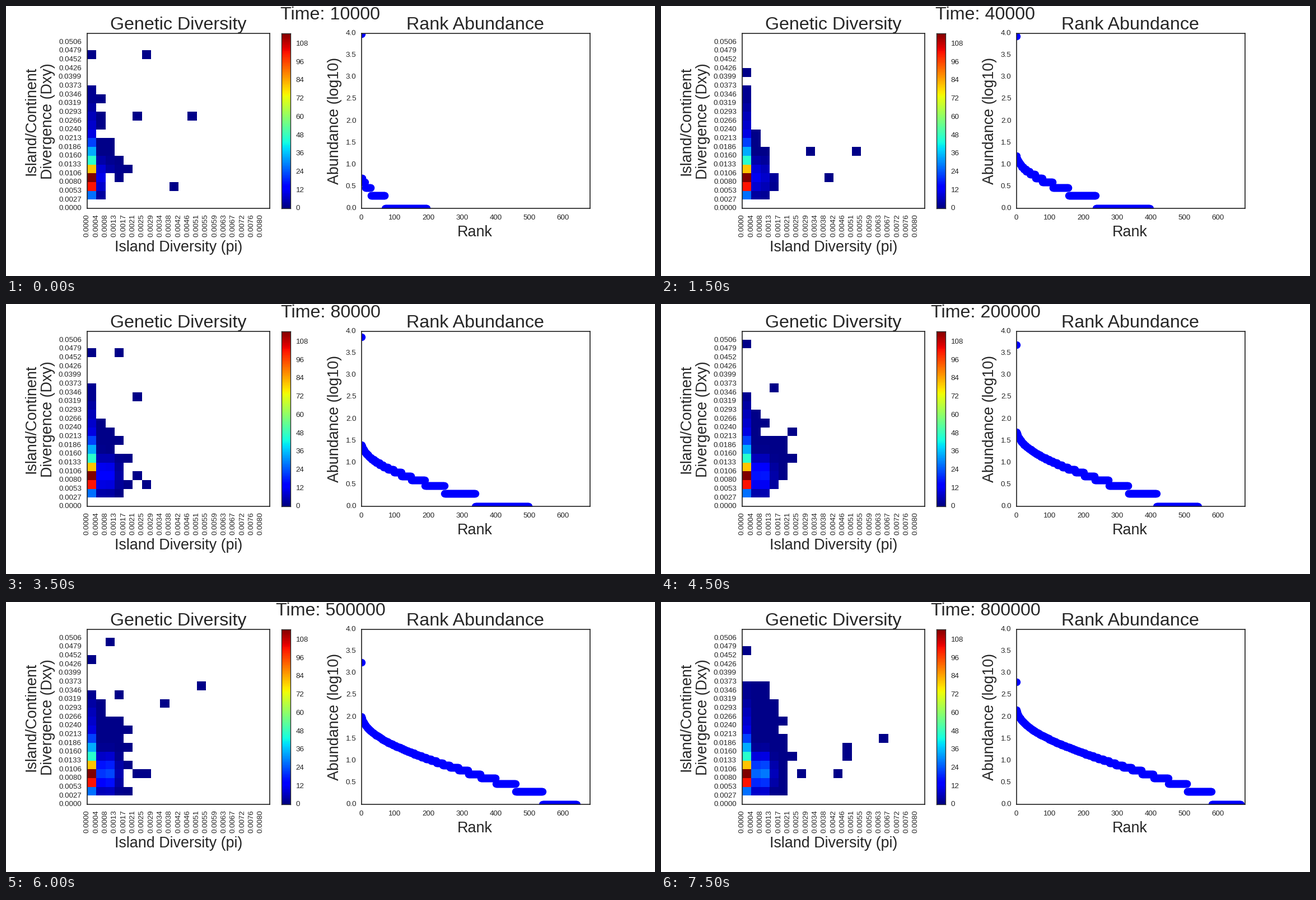
A matplotlib script for the animation above (8000 ms loop, 1159 px wide and 483 px high).

```python
import numpy as np
import matplotlib.pyplot as plt
from matplotlib.animation import FuncAnimation

W, H, DPI = 1159, 483, 64
INTERVAL = 500
BINS = 20
VMAX = 115
INK = "#262626"
TITLE, LABEL, TICK = 32.3, 26.9, 13.4
TOP, BOTTOM = 48.9, 362.4
HEAT_X = (145, 471)
BAR_X = (491.5, 508)
RANK_X = (634.5, 1043)
RANK_MAX = 681

# Fine steps first, then coarse ones
TIMES = [*range(10000, 100000, 10000), *range(200000, 900000, 100000)]
FRAMES = len(TIMES)

plt.rcParams["font.family"] = "Liberation Sans"


def pt(px):
    return px * 72 / DPI


def cell_count(col, row, p):
    """Species in one bin at progress p: a ridge that fades to the right."""
    if col == 0:
        return np.interp(row, [1, 2, 3, 5, 8, 12], [27, 102, 115, 46, 10, 2])
    amp = {1: 11 + 15 * p ** 2, 2: 5 + 23 * p ** 1.3, 3: 2 + 4 * p}.get(col, 1)
    return max(1, amp * np.exp(-((row - 3.1) / 1.9) ** 2))


def reach(row, p):
    """Filled width of a row; the bulge grows taller and wider with time."""
    spread = 4 if row < 3 else 5 + 6 * p
    return 1 + (2.2 + 2.2 * p) * max(0, 1 - ((row - 3) / spread) ** 2)


def heat_grid(step):
    rng = np.random.default_rng(step)
    p = step / (FRAMES - 1)
    grid = np.ma.masked_all((BINS, BINS))
    for row in range(1, rng.integers(12, 15)):
        width = max(1, round(reach(row, p) + rng.uniform(-0.9, 0.9)))
        for col in range(width):
            grid[row, col] = cell_count(col, row, p)
    # Rare species: one high in the first column, a few far to the right
    grid[rng.integers(15, 19), 0] = 1
    for _ in range(rng.integers(4, 8)):
        col = min(17, int(2 + rng.exponential(5)))
        row = min(18, int(2 + rng.exponential(5)))
        if grid.mask[row, col]:
            grid[row, col] = 1
    return grid


def rank_curve(step):
    """Whole-number abundances by rank, led by one dominant species."""
    time = TIMES[step]
    age = np.log10(time)
    keys = np.log10([1e4, 8e4, 2e5, 5e5, 8e5])
    species = round(np.interp(age, keys, [195, 498, 541, 641, 668]))
    peak = 0.85 + 0.74 * (age - 4)
    ranks = np.arange(1, species + 1)
    fall = 1 - (ranks / species) ** 0.43
    y = peak * fall ** (1.17 - 0.205 * peak)
    y = np.log10(np.floor(10 ** y + 1e-6))
    return np.r_[0, ranks], np.r_[3.995 - 1.49e-6 * time, y]


fig = plt.figure(figsize=(W / DPI, H / DPI), dpi=DPI, facecolor="white")
page = fig.add_axes([0, 0, 1, 1])
page.set(xlim=(0, W), ylim=(H, 0))
page.axis("off")


def panel(x0, x1, line):
    ax = fig.add_axes([x0 / W, 1 - BOTTOM / H, (x1 - x0) / W,
                       (BOTTOM - TOP) / H])
    ax.set_xticks([])
    ax.set_yticks([])
    for spine in ax.spines.values():
        spine.set(linewidth=pt(line), edgecolor=INK)
    return ax


def heading(x, y, s, size, rotation=0):
    return page.text(x, y, s, fontsize=pt(size), color=INK, ha="center",
                     va="baseline", rotation=rotation, rotation_mode="anchor")


def tick(x, y, s, ha="center", rotation=0):
    page.text(x, y, s, fontsize=pt(TICK), color=INK, ha=ha, va="center",
              rotation=rotation)


def height_at(f):
    return BOTTOM - (BOTTOM - TOP) * f


heat_ax = panel(*HEAT_X, 1.7)
bar_ax = panel(*BAR_X, 1.3)
rank_ax = panel(*RANK_X, 1.7)

style = dict(cmap="jet", aspect="auto", origin="lower",
             interpolation="nearest")
heat = heat_ax.imshow(np.ma.masked_all((BINS, BINS)), vmin=0, vmax=VMAX,
                      extent=(0, BINS, 0, BINS), **style)
bar_ax.imshow(np.arange(256)[:, None], extent=(0, 1, 0, VMAX), **style)
rank_ax.set(xlim=(0, RANK_MAX), ylim=(0, 4))
dots, = rank_ax.plot([], [], "o", color="blue", markersize=pt(13.4),
                     markeredgewidth=0)

heading(307.6, 42.2, "Genetic Diversity", TITLE)
heading(838.3, 42.2, "Rank Abundance", TITLE)
clock = heading(W / 2, 24, "", TITLE)
heading(308.4, 439, "Island Diversity (pi)", LABEL)
heading(837.5, 412, "Rank", LABEL)
heading(52.2, 206, "Island/Continent", LABEL, 90)
heading(81.5, 206, "Divergence (Dxy)", LABEL, 90)
heading(593.5, 205.5, "Abundance (log10)", LABEL, 90)

for k in range(BINS):
    x = HEAT_X[0] + (HEAT_X[1] - HEAT_X[0]) * k / BINS
    tick(x, 393, f"{k * 0.000421:.4f}", rotation=90)
    tick(135, height_at(k / BINS), f"{k * 0.0026613:.4f}", "right")
for v in range(0, 109, 12):
    tick(517.5, height_at(v / VMAX), str(v), "left")
for v in range(0, 601, 100):
    tick(RANK_X[0] + (RANK_X[1] - RANK_X[0]) * v / RANK_MAX, 379.3, str(v))
for v in np.arange(0, 4.1, 0.5):
    tick(625.5, height_at(v / 4), f"{v:.1f}", "right")


def draw(step):
    heat.set_data(heat_grid(step))
    dots.set_data(*rank_curve(step))
    clock.set_text(f"Time: {TIMES[step]}")
    return heat, dots, clock


anim = FuncAnimation(fig, draw, frames=FRAMES, interval=INTERVAL,
                     repeat=True, repeat_delay=0)
plt.show()
```
